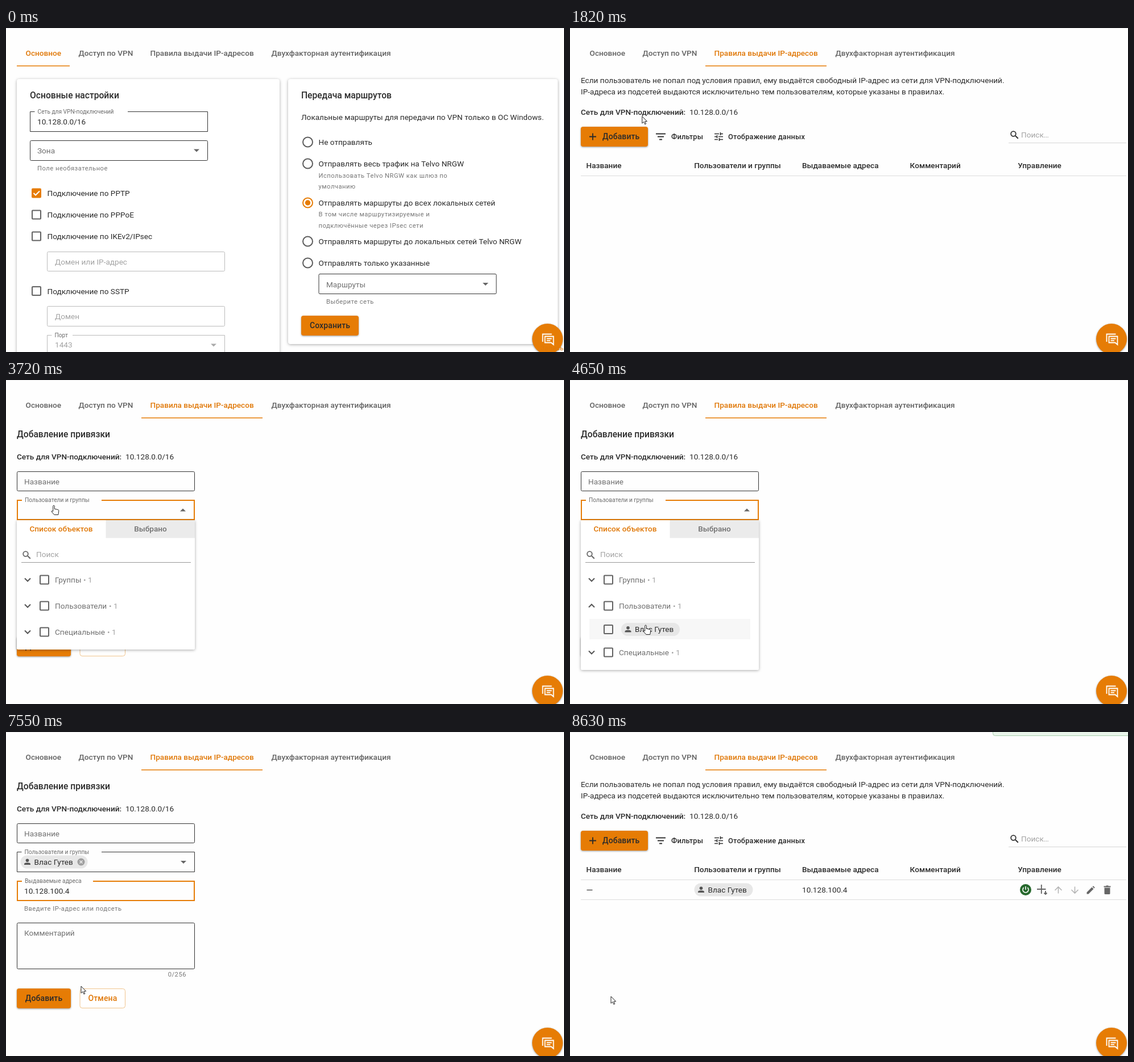
Write an HTML page that moves like this. It is 981 by 571 pixels and loops after 9000 ms.

```html
<!DOCTYPE html>
<html lang="ru">
<meta charset="utf-8">
<style>
  html, body { margin: 0; width: 100%; height: 100%; overflow: hidden; background: #fefefe; }
  svg { display: block; font: 13.6px Roboto, sans-serif; fill: #2b2b2b; }
  text { white-space: pre; }
  .medium { font-weight: 500; }
  .title { font-weight: 500; font-size: 15.6px; }
  .label { font-size: 10.2px; fill: #6c6c6c; }
  .hint { font-size: 11.2px; letter-spacing: .5px; fill: #767676; }
  .button { font-weight: 500; font-size: 14px; letter-spacing: .1px; }
  .tool { font-weight: 500; font-size: 12.8px; letter-spacing: .2px; }
  .grey { fill: #707070; }
  .pale { fill: #a3a3a3; }
  .tab { font-weight: 500; fill: #626262; }
  .accent { fill: #e07808; }
  .card { fill: #fff; filter: drop-shadow(0 1px 2.5px #0005); }
  .raised { filter: drop-shadow(0 1px 1.5px #0006); }
  .line { fill: none; }
</style>
<svg id="stage" width="981" height="571" viewBox="0 0 981 571"></svg>
<script>
const ORANGE = '#e67c05', LOOP = 9000;
const PERSON = 'Влас Гутев', GATEWAY = 'Telvo NRGW', NETWORK = '10.128.0.0/16', ADDRESS = '10.128.100.4';

const text = (x, y, s, cls = '', anchor = 'start') =>
  `<text x="${x}" y="${y}" class="${cls}" text-anchor="${anchor}">${s}</text>`;
const rect = (x, y, w, h, fill, r = 0, more = '') =>
  `<rect x="${x}" y="${y}" width="${w}" height="${h}" rx="${r}" fill="${fill}" ${more}/>`;
const line = (d, color, width = 1) => `<path class="line" d="${d}" stroke="${color}" stroke-width="${width}"/>`;
const shape = (d, color) => `<path d="${d}" fill="${color}"/>`;
const at = (x, y, content) => `<g transform="translate(${x} ${y})">${content}</g>`;
const group = (id, ...parts) => `<g id="${id}">${parts.join('')}</g>`;

// Outlined input; a label sits in a gap that ends at gapEnd
const field = (x, y, w, h, { color = '#333', width = 1, label = '', gapEnd = 0 } = {}) => label
  ? line(`M${x + 8} ${y}H${x}V${y + h}H${x + w}V${y}H${gapEnd}`, color, width) + text(x + 13, y + 3, label, 'label')
  : rect(x, y, w, h, 'none', 2, `stroke="${color}" stroke-width="${width}"`);
const triangle = (x, y, dir = 1, color = '#666') => shape(`M${x - 5} ${y - 2.5 * dir}h10l-5 ${5 * dir}z`, color);
const checkbox = (x, y) => rect(x - 7.5, y - 7.5, 15, 15, 'none', 1, 'stroke="#626262" stroke-width="2"');
const checked = (x, y) => rect(x - 8.5, y - 8.5, 17, 17, ORANGE, 2) +
  line(`M${x - 5} ${y}l3.5 3.5 7-7`, '#fff', 2);
const radio = (y, label, on) =>
  `<circle cx="530.5" cy="${y}" r="8.5" class="line" stroke="${on ? ORANGE : '#5c5c5c'}" stroke-width="2"/>` +
  (on ? `<circle cx="530.5" cy="${y}" r="4.7" fill="${ORANGE}"/>` : '') + text(549.5, y + 4.5, label);
const button = (x, y, w, label, textX = x + w / 2, anchor = 'middle') =>
  rect(x, y, w, 35, ORANGE, 4, 'class="raised"') + text(textX, y + 21.5, label, 'button', anchor);
const search = (x, y, color = '#333') => at(x, y,
  `<circle cx="-1.5" cy="-1.5" r="4.3" class="line" stroke="${color}" stroke-width="1.8"/>` + line('M2 2l4.8 4.8', color, 2));
const chip = (x, y, w = 103) => at(x, y, rect(0, -11.5, w, 23, '#e7e7e7', 11.5) +
  at(12, 0, '<circle cy="-2.8" r="2.8" fill="#555"/>' + shape('M-5.5 5V3.6C-5.5 .4 5.5 .4 5.5 3.6V5Z', '#555')) +
  text(24, 4.5, PERSON));
const network = y => text(19, y, 'Сеть для VPN-подключений:', 'medium') + text(210, y, NETWORK);
const chevron = (y, dir) => line(`M33 ${y - 2.5 * dir}l5 ${5 * dir} 5 ${-5 * dir}`, '#555', 2);
const treeRow = (y, label, dir, countX) =>
  chevron(y, dir) + checkbox(67.5, y) + text(86, y + 4.5, label, 'grey') + text(countX, y + 4.5, '• 1', 'pale');

const tabs = [[34.5, 'Основное'], [127.5, 'Доступ по VPN'], [253.5, 'Правила выдачи IP-адресов'],
  [466.5, 'Двухфакторная аутентификация']];

const mainPage = group('main',
  rect(19, 90, 462, 500, '#fff', 4, 'class="card"'),
  text(42, 123.5, 'Основные настройки', 'title'),
  field(42.5, 147.5, 312, 35, { label: 'Сеть для VPN-подключений', gapEnd: 214 }), text(55, 170, NETWORK),
  field(42.5, 198.5, 312, 35), text(55, 221, 'Зона', 'grey'), triangle(335, 216),
  text(55, 250.5, 'Поле необязательное', 'hint'),
  checked(53.5, 291), ...[329, 367, 463.5].map(y => checkbox(53.5, y)),
  ...[['PPTP', 295.5], ['PPPoE', 333.5], ['IKEv2/IPsec', 371.5], ['SSTP', 468.5]]
    .map(([name, y]) => text(72.5, y, 'Подключение по ' + name)),
  field(72.5, 394.5, 312, 34, { color: '#bbb' }), text(86, 416.5, 'Домен или IP-адрес', 'pale'),
  field(72.5, 490.5, 312, 35, { color: '#bbb' }), text(86, 513, 'Домен', 'pale'),
  field(72.5, 541.5, 312, 35, { color: '#bbb', label: 'Порт', gapEnd: 117 }), text(86, 563, '1443', 'pale'),
  triangle(365, 559, 1, '#aaa'),
  rect(496, 90, 474, 467, '#fff', 4, 'class="card"'),
  text(519, 123.5, 'Передача маршрутов', 'title'),
  text(519, 161.5, 'Локальные маршруты для передачи по VPN только в ОС Windows.'),
  radio(201, 'Не отправлять'),
  radio(239, 'Отправлять весь трафик на ' + GATEWAY),
  text(549.5, 263.5, `Использовать ${GATEWAY} как шлюз по`, 'hint'), text(549.5, 282.5, 'умолчанию', 'hint'),
  radio(308, 'Отправлять маршруты до всех локальных сетей', true),
  text(549.5, 332, 'В том числе маршрутизируемые и', 'hint'), text(549.5, 351.5, 'подключённые через IPsec сети', 'hint'),
  radio(376, 'Отправлять маршруты до локальных сетей ' + GATEWAY),
  radio(414, 'Отправлять только указанные'),
  field(550, 433.5, 312, 35), text(563, 456.5, 'Маршруты', 'grey'), triangle(843, 451.5),
  text(563, 486, 'Выберите сеть', 'hint'),
  button(519, 507, 101, 'Сохранить'));

const listPage = group('list',
  text(19, 97, 'Если пользователь не попал под условия правил, ему выдаётся свободный IP-адрес из сети для VPN-подключений.'),
  text(19, 117, 'IP-адреса из подсетей выдаются исключительно тем пользователям, которые указаны в правилах.'),
  network(153),
  button(19, 174, 118, 'Добавить', 57, 'start'), line('M34 191.5h12M40 185.5v12', '#2b2b2b', 1.8),
  line('M151 186.5h17M154 191.5h11M157 196.5h5', '#333', 2), text(178, 195.5, 'Фильтры', 'tool'),
  line('M254 186.5h8M265 186.5h4M254 191.5h4M261 191.5h8M254 196.5h6M263 196.5h6M264.5 184v5M258.5 189v5M262.5 194v5', '#333', 1.7),
  text(278, 195.5, 'Отображение данных', 'tool'),
  search(781, 188), text(793, 192.5, 'Поиск…', 'pale'), line('M771 202.5H978', '#d5d5d5'),
  ...['Название', 'Пользователи и группы', 'Выдаваемые адреса', 'Комментарий', 'Управление']
    .map((name, i) => text(28.5 + i * 189.7, 246.5, name, 'medium')),
  line('M19 260.5H978', '#ddd'),
  group('row',
    line('M29.5 278.5h10', '#333', 1.2), chip(218.5, 278), text(408, 283, ADDRESS), line('M19 295.5H978', '#ddd'),
    at(801, 278, '<circle r="10" fill="#27692d"/>' + line('M0-6V0M-3.3-3.8A5 5 0 1 0 3.3-3.8', '#fff', 1.6)),
    at(829.5, 278, line('M-8.5-1H7M-.7-9V7M6.5 2V8M4 5.5L6.5 8 9 5.5', '#666', 1.9)),
    at(858.5, 278.5, line('M0 6V-5M-6 .5L0-5.5 6 .5', '#b5b5b5', 1.6)),
    at(887.5, 278.5, line('M0-6V5M-6-.5L0 5.5 6-.5', '#b5b5b5', 1.6)),
    at(915.5, 278.5, shape('M-7 7V4L2-5 5-2-4 7ZM3-6L4.5-7.2 7.2-4.5 6-3Z', '#666')),
    at(944.5, 278.5, shape('M-6-7H-2.5L-1.5-8H1.5L2.5-7H6V-5H-6ZM-5-4H5V6Q5 7.5 3.5 7.5H-3.5Q-5 7.5-5 6Z', '#666'))));

const userLabel = { label: 'Пользователи и группы', gapEnd: 168 };
const focus = { color: ORANGE, width: 2 };
const formPage = group('form',
  text(19, 101, 'Добавление привязки', 'title'), network(139.5),
  field(19.5, 161.5, 312, 34), text(32, 183.5, 'Название', 'grey'),
  group('usersEmpty', field(19.5, 211.5, 312, 35), text(32, 234.5, 'Пользователи и группы', 'grey'), triangle(312, 229.5)),
  group('usersOpen', field(20, 212, 311, 34, { ...focus, ...userLabel }), triangle(311, 229, -1)),
  group('usersDone', field(19.5, 211.5, 312, 35, userLabel), triangle(312, 229.5)),
  group('userChip', chip(25.5, 229, 118),
    at(132, 229, '<circle r="6.5" fill="#a0a0a0"/>' + line('M-2.5-2.5l5 5M2.5-2.5l-5 5', '#eee', 1.4))),
  group('addressEmpty', field(19.5, 262.5, 312, 35), text(32, 285, 'Выдаваемые адреса', 'grey')),
  group('addressFocus', field(20, 263, 311, 34, { ...focus, label: 'Выдаваемые адреса', gapEnd: 153 })),
  group('caret', line('M33.5 272v15', '#333')),
  group('addressText', text(32, 284.5, ADDRESS)),
  text(32, 314.5, 'Введите IP-адрес или подсеть', 'hint'),
  field(19.5, 336.5, 312, 81), text(32, 359, 'Комментарий', 'grey'),
  text(317, 431, '0/256', 'hint', 'end'),
  button(19, 452, 95, 'Добавить'),
  rect(130, 452.5, 79.5, 34, '#fff', 4, 'stroke="#f0c48d"'), text(170, 473.5, 'Отмена', 'button accent', 'middle'));

const dropdown = group('dropdown',
  rect(19, 247, 313, 228, '#fff', 2, 'id="panel" class="card"'),
  rect(175.5, 247, 156.5, 31.5, '#ebebeb'),
  text(97, 267, 'Список объектов', 'medium accent', 'middle'), text(254, 267, 'Выбрано', 'medium grey', 'middle'),
  search(36, 308, '#666'), text(53, 312, 'Поиск', 'pale'), line('M27 321.5H325', '#999'),
  treeRow(352, 'Группы', 1, 136),
  group('folded', treeRow(398, 'Пользователи', 1, 181)),
  group('unfolded', treeRow(398, 'Пользователи', -1, 181), rect(34, 421, 283, 36, '#f7f7f7'),
    checkbox(67.5, 439.5), group('userChecked', checked(67.5, 439.5)), chip(90, 439.5)),
  group('special', treeRow(444, 'Специальные', 1, 178)));

const chat = group('chat',
  `<circle cx="952" cy="548" r="27" fill="${ORANGE}" class="raised"/>`,
  line('M943.5 553V539.5H959.5M947.5 543.5H962.5V558L958.5 554.5H947.5ZM950.5 547.5h9M950.5 550.8h6.5', '#fff', 1.8));

const pointers =
  group('arrow', '<path d="M0 0V12.2L2.9 9.6 4.9 14 6.8 13.2 4.9 8.9H8.7Z" fill="#fff" stroke="#222"/>') +
  group('hand', '<path d="M-1.3 1.3C-1.3-.4 1.3-.4 1.3 1.3V6.2L7.2 7.4Q9 7.9 8.8 9.6L7.8 16.5H.8L-4.2 10.6Q-3.4 9-1.3 10.4Z" fill="#fff" stroke="#222"/>') +
  group('beam', line('M-2.5-6.5H2.5M0-6.5V6.5M-2.5 6.5H2.5', '#222'));

const stage = document.getElementById('stage');
stage.innerHTML = `<clipPath id="tabClip">${rect(238, 21, 213, 46)}</clipPath>
  <clipPath id="addClip">${rect(19, 452, 95, 35, '', 4)}</clipPath>` +
  line('M0 .5H981', '#f1f1f1') +
  `<circle id="tabRipple" cx="287" cy="48" fill="${ORANGE}" clip-path="url(#tabClip)"/>` +
  tabs.map(([x, s], i) => group('tab' + i, text(x, 49, s, 'tab'))).join('') +
  `<rect id="underline" y="66" height="1.5" fill="${ORANGE}"/>` +
  mainPage + listPage + formPage +
  '<circle id="addRipple" cx="72" cy="466" clip-path="url(#addClip)"/>' +
  dropdown + `<path id="spinner" class="line" stroke="${ORANGE}" stroke-width="2"/>` + chat +
  group('recording', text(940, 568, 'Запись', 'hint accent')) +
  group('toast', rect(743.5, -40, 250, 46.5, '#e9f5ea', 4, 'stroke="#a9cfae"')) +
  group('pointer', pointers);

const el = {};
stage.querySelectorAll('[id]').forEach(node => el[node.id] = node);
const set = (id, attrs) => Object.entries(attrs).forEach(([k, v]) => el[id].setAttribute(k, v));

const visible = {
  recording: [[0, 70]], main: [[0, 1240]], spinner: [[1240, 1480]], list: [[1480, 2160], [8290, LOOP]],
  row: [[8290, LOOP]], form: [[2160, 8290]], usersEmpty: [[0, 3720]], usersOpen: [[3720, 5270]],
  usersDone: [[5270, LOOP]], userChip: [[4760, LOOP]], dropdown: [[3720, 5270]], folded: [[0, 4440]],
  unfolded: [[4440, LOOP]], userChecked: [[4760, LOOP]], addressEmpty: [[0, 6340]], addressFocus: [[6340, LOOP]],
  caret: [[6410, 6770]], addressText: [[6770, LOOP]], toast: [[8630, LOOP]],
  arrow: [[0, 940], [1480, 1930], [4900, 6080], [7180, 7760], [8290, LOOP]],
  hand: [[940, 1480], [1930, 2160], [3180, 4900], [7760, 8290]],
  beam: [[2160, 3180], [6080, 7180]],
};

// Pointer stops: time, x, y
const route = [[0, 916, 585], [260, 916, 580], [1010, 288, 48], [1400, 288, 48], [2030, 71, 193], [2680, 71, 193],
  [3500, 84, 221], [3780, 84, 221], [4240, 39, 394], [4440, 39, 394], [4640, 133, 432], [4800, 133, 432],
  [5220, 494, 384], [5390, 494, 384], [6200, 131, 281], [7110, 131, 281], [7310, 366, 350], [7550, 132, 448],
  [7900, 72, 466], [LOOP, 72, 466]];

const progress = (t, start, length) => {
  const p = Math.min(1, Math.max(0, (t - start) / length));
  return p * p * (3 - 2 * p);
};
const mix = (a, b, p) => a + (b - a) * p;

function ripple(id, t, start, strength) {
  const age = t - start;
  set(id, { r: age > 0 && age < 450 ? age * .45 : 0, opacity: strength * (1 - progress(age, 220, 230)) });
}

function draw(t) {
  for (const id in visible)
    el[id].style.display = visible[id].some(([from, to]) => t >= from && t < to) ? '' : 'none';

  const active = t < 1160 ? 0 : 2;
  tabs.forEach((_, i) => el['tab' + i].firstChild.setAttribute('class', i === active ? 'tab accent' : 'tab'));
  const slide = progress(t, 1260, 400);
  set('underline', { x: mix(19, 238, slide), width: mix(93, 213, slide) });
  ripple('tabRipple', t, 1160, .15);
  ripple('addRipple', t, 8060, .12);

  const sweep = .05 + 4 * progress(t, 1250, 300);
  set('spinner', { d: `M521 336A22 22 0 ${+(sweep > Math.PI)} 1 ${499 + 22 * Math.cos(sweep)} ${336 + 22 * Math.sin(sweep)}` });

  const unfold = 36 * progress(t, 4440, 150);
  set('panel', { height: 228 + unfold });
  set('special', { transform: `translate(0 ${unfold})` });

  const next = route.findIndex(stop => stop[0] > t);
  const [from, x, y] = route[next - 1], [to, x2, y2] = route[next];
  const p = progress(t, from, to - from);
  set('pointer', { transform: `translate(${mix(x, x2, p)} ${mix(y, y2, p)})` });
}

function tick() {
  draw(performance.now() % LOOP);
  requestAnimationFrame(tick);
}
tick();
</script>
</html>
```
